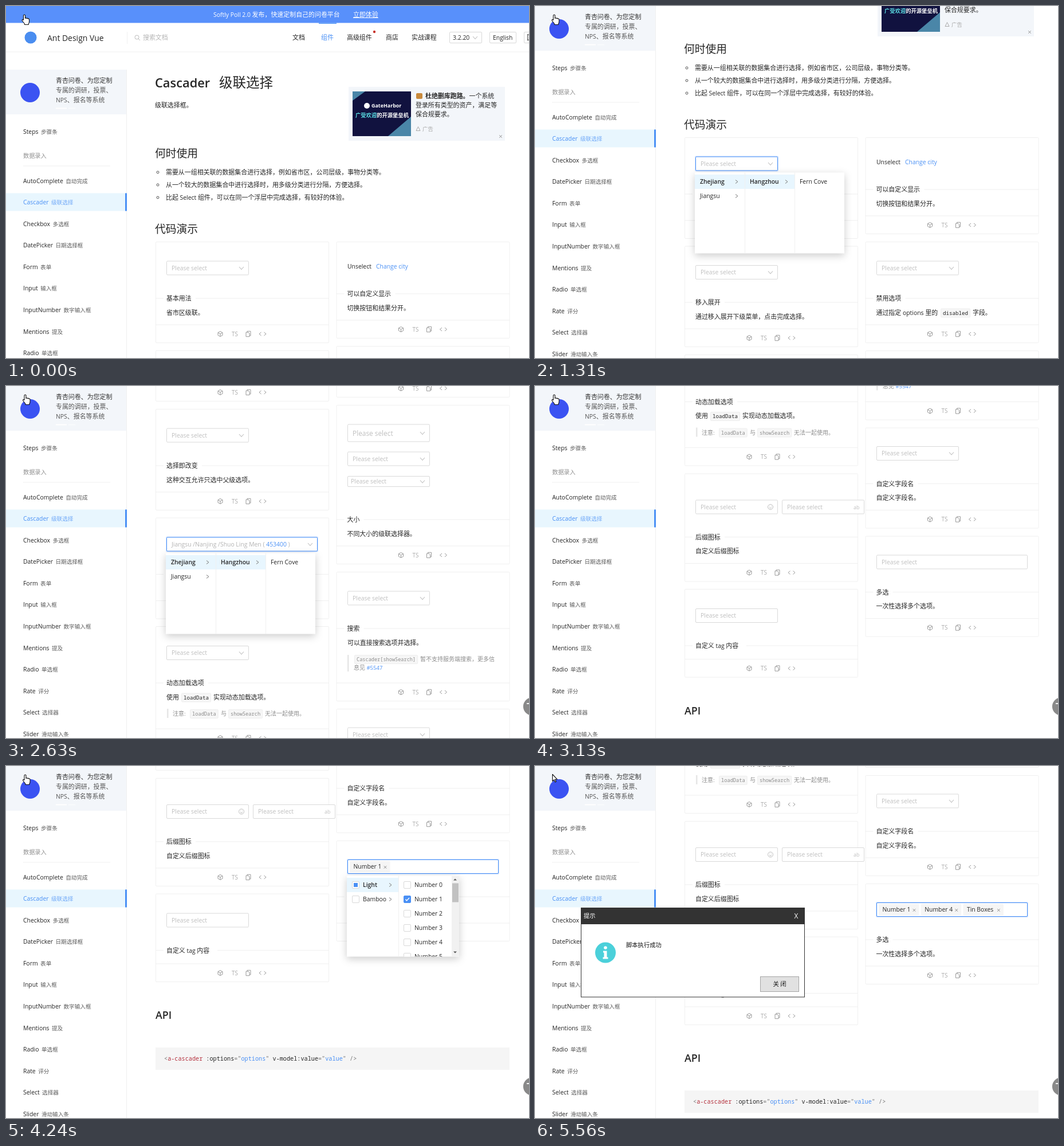
An HTML page for the animation above (5950 ms loop, 913 px wide and 614 px high).

```html
<!DOCTYPE html>
<html lang="zh-CN">
<head>
<meta charset="utf-8">
<title>Cascader</title>
<style>
html, body { margin: 0; width: 100%; height: 100%; overflow: hidden; background: #fff; }
svg { display: block; }
text { white-space: pre; font-family: "Open Sans", "Noto Sans CJK SC", "Noto Sans CJK", sans-serif; }
.mono { font-family: "Noto Sans Mono", "DejaVu Sans Mono", monospace; }
.pop { filter: drop-shadow(0 4px 7px rgba(0, 0, 0, .2)); }
</style>
</head>
<body>
<svg id="stage" width="913" height="614" viewBox="0 0 913 614"></svg>
<script>
const INK = '#262626', BLUE = '#4a90f5', HINT = '#bfbfbf', LINE = '#f0f0f0', ACTIVE = '#e8f6fe';
const LOOP = 5950, HINT_TEXT = 'Please select';

// drawing helpers
const esc = s => s.replace(/&/g, '&amp;').replace(/</g, '&lt;');
const latin = s => s.replace(/[ -~]+/g, m => `<tspan font-size=".95em">${esc(m)}</tspan>`);

// y is the optical middle of the line; s is a string or [text, attributes] runs
function text(x, y, s, { z = 10.95, c = INK, w = 400, mono, mid } = {}) {
  const fit = mono ? esc : latin;
  const body = typeof s === 'string' ? fit(s)
    : s.map(([t, a]) => `<tspan ${a}>${fit(t)}</tspan>`).join('');
  return `<text x="${x}" y="${y + z * .36}" font-size="${z}" fill="${c}" font-weight="${w}"` +
    `${mono ? ' class="mono"' : ''}${mid ? ' text-anchor="middle"' : ''}>${body}</text>`;
}
const rect = (x, y, w, h, fill, more = '') =>
  `<rect x="${x}" y="${y}" width="${w}" height="${h}" fill="${fill}" ${more}/>`;
const box = (x, y, w, h, stroke, fill = '#fff', r = 1.5) =>
  rect(x + .5, y + .5, w - 1, h - 1, fill, `stroke="${stroke}" rx="${r}"`);
const dot = (x, y, r, fill, more = '') => `<circle cx="${x}" cy="${y}" r="${r}" fill="${fill}" ${more}/>`;
const line = (x, y, d, c = '#999', w = 1) =>
  `<path transform="translate(${x} ${y})" d="${d}" fill="none" stroke="${c}" stroke-width="${w}"/>`;
const hr = (x1, x2, y) => rect(x1, y - .5, x2 - x1, 1, LINE);
const down = (x, y) => line(x, y, 'M-4-2L0 2.5 4-2', HINT, 1.1);
const next = (x, y) => line(x, y, 'M-2-3L2 0-2 3', '#777');
const cross = (x, y, r = 2.2) => line(x, y, `M${-r} ${-r}L${r} ${r}M${-r} ${r}L${r} ${-r}`, '#888');

function chip(x, y, s, z = 9.2, c = INK) {
  return box(x, y - 7.5, s.length * z * .6 + 8, 16, '#eee', '#f6f6f6') + text(x + 4, y + .5, s, { z, c, mono: 1 });
}

function select(x, y, w = 144, { h = 25, label = HINT_TEXT, c = HINT, focus, icon = 'v', z } = {}) {
  const end = x + w - 13;
  return (focus ? rect(x - 1, y - h / 2 - 1, w + 2, h + 2, '#cfe2ff', 'rx="2"') : '') +
    box(x, y - h / 2, w, h, focus ? BLUE : '#d9d9d9') +
    text(x + (h < 20 ? 6 : 9), y, label, { c, z }) +
    (icon === 'v' ? down(end, y)
      : icon === 'ab' ? text(end - 6, y + .5, 'ab', { z: 9.5, c: HINT })
      : icon === 'smile' ? dot(end, y, 4.5, 'none', `stroke="${HINT}"`) + line(end, y, 'M-2.2 1Q0 3.4 2.2 1M-1.8-1.5h.8M1-1.5h.8', HINT)
      : '');
}

function card(x, top, bottom, title, note, body, gap = 77.5) {
  const y = bottom - 16, ty = bottom - gap, g = '#9a9a9a';
  return box(x, top, 303, bottom - top, LINE) + hr(x, x + 303, ty - .5) +
    rect(x + 14, ty - 6, title.replace(/[ -~]/g, '').length * 11 + (/[a-z]/.test(title) ? 27 : 0) + 12, 12, '#fff') +
    text(x + 19, ty, title, { w: 500 }) + text(x + 19, bottom - 53, note) +
    hr(x, x + 303, bottom - 32) +
    line(x + 113, y, 'M0-4.5L4-2.3V2.3L0 4.5-4 2.3V-2.3ZM-4-2.3L0 0 4-2.3M0 0V4.5', g) +
    text(x + 133, y, 'TS', { z: 10.4, c: '#aaa' }) +
    line(x + 162, y, 'M-2-3V-4.7H4V3H2M-4-2.8H0L2-1V4.7H-4Z', g) +
    line(x + 187, y, 'M-2.5-3L-6 0-2.5 3M2.5-3L6 0 2.5 3', g) + body;
}

// columns: { w, items, on, check(i), bar }; an item ending in ">" has children
function menu(x, y, cols, alpha = 1) {
  const total = cols.reduce((sum, c) => sum + c.w, 0);
  let out = rect(x, y, total, 141, '#fff', 'class="pop"'), cx = x;
  cols.forEach((col, n) => {
    out += `<svg x="${cx}" y="${y}" width="${col.w}" height="141">`;
    col.items.forEach((item, i) => {
      const my = 16 + i * 25, on = col.on === i, mark = col.check && col.check(i);
      if (on) out += rect(0, my - 12.5, col.w, 25, ACTIVE);
      if (col.check) {
        out += box(9, my - 6.5, 13, 13, mark === 'all' ? BLUE : '#d9d9d9', mark === 'all' ? BLUE : '#fff');
        if (mark === 'all') out += line(15.5, my, 'M-3 0L-1 2.5 3.5-2.5', '#fff', 1.4);
        if (mark === 'some') out += rect(12, my - 3.5, 7, 7, BLUE);
      }
      out += text(col.check ? 28 : 9, my, item.replace('>', ''), { w: on ? 600 : 400 });
      if (item.endsWith('>')) out += next(col.w - 14, my);
    });
    if (col.bar) out += rect(93, 0, 13, 141, '#f1f1f1') + rect(94, 13, 11, 33, '#c1c1c1') +
      '<path d="M96 8l3-3 3 3zM96 132l3 3 3-3z" fill="#555"/>';
    out += '</svg>';
    if (n) out += rect(cx, y, 1, 141, LINE);
    cx += col.w;
  });
  return `<g opacity="${alpha}">${out}</g>`;
}

// page parts
function header() {
  const nav = [['文档', 500], ['组件', 550], ['高级组件', 595], ['商店', 663], ['实战课程', 708]];
  return rect(0, 0, 913, 29.5, '#5890fb') +
    text(362, 15, 'Softly Poll 2.0 发布，快速定制自己的问卷平台', { c: '#fff' }) +
    text(606, 15, [['立即体验', 'text-decoration="underline"']], { c: '#fff' }) +
    hr(0, 913, 80) + dot(43, 55, 10.5, '#4a8df0') + text(72, 55.5, 'Ant Design Vue', { z: 14.7, w: 500 }) +
    rect(211, 45, 1, 21, LINE) + dot(228.5, 54.5, 3.5, 'none', 'stroke="#bbb"') +
    line(231, 57, 'M0 0l3 3', '#bbb') + text(239, 55, '搜索文档', { c: '#b5b5b5' }) +
    nav.map(([s, x]) => text(x, 55, s, { c: x === 550 ? BLUE : INK })).join('') +
    rect(546, 29.5, 31, 1.5, BLUE) + dot(643, 45, 2.2, '#c8322b') +
    box(774, 45, 57, 20, '#d9d9d9') + text(780, 55, '3.2.20') + down(819, 55) +
    box(844, 45, 47, 20, '#d9d9d9') + text(850, 55, 'English') +
    box(904, 45, 40, 20, '#d9d9d9') + text(909, 55, '国内');
}

function intro() {
  const points = ['需要从一组相关联的数据集合进行选择，例如省市区，公司层级，事物分类等。',
    '从一个较大的数据集合中进行选择时，用多级分类进行分隔，方便选择。',
    '比起 Select 组件，可以在同一个浮层中完成选择，有较好的体验。'];
  return text(260, 134, 'Cascader', { z: 23, w: 600 }) + text(372, 134, '级联选择', { z: 23.5, w: 500 }) +
    text(260, 173.5, '级联选择框。') +
    rect(598, 141, 273, 94, '#f3f6fa') + rect(605, 149, 102, 78, '#11123f') +
    '<path d="M605 149h22l-22 16zM707 227h-40l40-34z" fill="#4a86a8"/>' +
    dot(630, 174, 5, '#fff') + text(638, 174, 'GateHarbor', { z: 9.4, w: 700, c: '#fff' }) +
    text(610, 190.5, [['广受欢迎', 'fill="#5ce0e6"'], ['的开源堡垒机', '']], { z: 9.3, w: 700, c: '#fff' }) +
    rect(716, 152, 11, 10, '#c98a3c', 'rx="2"') +
    text(732, 157, [['杜绝删库跑路。', 'font-weight="700"'], ['一个系统', '']]) +
    text(715, 173, '登录所有类型的资产，满足等') + text(715, 189, '保合规要求。') +
    line(719.5, 214.5, 'M-3.5 3L0-4 3.5 3Z', '#aaa') + text(727, 214.5, '广告', { z: 9.4, c: '#aaa' }) + cross(863.5, 227.5) +
    text(260, 257, '何时使用', { z: 18.8, w: 500 }) +
    points.map((s, i) => dot(265, 290 + i * 22, 2, '#fff', 'stroke="#555"') + text(279, 290 + i * 22, s)).join('') +
    text(260, 389, '代码演示', { z: 18.8, w: 500 });
}

function demos(s) {
  const L = 261, R = 576.5, lx = 280, rx = 596, grey = '#8c8c8c';
  const place = s.v4 ? ['Zhejiang /Hangzhou /Fern Cove ( ', '752100'] : ['Jiangsu /Nanjing /Shuo Ling Men ( ', '453400'];
  const label4 = [[place[0], ''], [place[1], `fill="${BLUE}"`], [' )', '']];
  const tags = s.tags.map((t, i) => rect(600 + i * 73.7, 1537.5, 70.5, 20, '#f5f5f5', 'rx="1.5"') +
    text(606.5 + i * 73.7, 1547.5, t) + cross(662 + i * 73.7, 1548.5)).join('');
  const code = [['<', 'fill="#777"'], ['a-cascader', 'fill="#b5323f"'], [' :options', ''], ['="', 'fill="#777"'],
    ['options', `fill="${BLUE}"`], ['" ', 'fill="#777"'], ['v-model:value', ''], ['="', 'fill="#777"'],
    ['value', `fill="${BLUE}"`], ['" />', 'fill="#777"']];
  return card(L, 411, 588, '基本用法', '省市区级联。',
      select(lx, 457, 144, { focus: s.focus === 1, label: s.v1 ? 'Zhejiang / Hangzhou…' : HINT_TEXT, c: s.v1 ? INK : HINT })) +
    card(L, 600.5, 777, '移入展开', '通过移入展开下级菜单，点击完成选择。', select(lx, 646.5)) +
    card(L, 790, 967, '选择即改变', '这种交互允许只选中父级选项。', select(lx, 836)) +
    card(L, 979.5, 1156.5, '自定义已选项', '例如给最后一项加上邮编链接。',
      select(lx, 1026, 264, { focus: s.focus === 4, label: label4, c: s.m4 ? '#b3b3b3' : INK })) +
    card(L, 1169, 1380, '动态加载选项', '', select(lx, 1215.5) +
      text(lx, 1293, '使用') + chip(306, 1293, 'loadData') + text(362, 1293, '实现动态加载选项。') +
      rect(281, 1313, 2.5, 16, '#e6e6e6') + text(291, 1321.5, '注意:', { z: 10, c: grey }) +
      chip(321, 1321.5, 'loadData', 8.7, grey) + text(375, 1321.5, '与', { z: 10, c: grey }) +
      chip(388, 1321.5, 'showSearch', 8.7, grey) + text(452, 1321.5, '无法一起使用。', { z: 10, c: grey }), 111.5) +
    card(L, 1393, 1582, '后缀图标', '自定义后缀图标',
      select(lx, 1451.5, 144, { icon: 'smile' }) + select(431, 1451.5, 144, { icon: 'ab' })) +
    card(L, 1594.5, 1749, '自定义 tag 内容', '', select(lx, 1641, 144, { icon: '' }), 55) +
    card(R, 411, 580, '可以自定义显示', '切换按钮和结果分开。',
      text(rx, 454, 'Unselect') + text(646, 454, 'Change city', { c: BLUE })) +
    card(R, 593, 770, '禁用选项', '通过指定 options 里的', select(rx, 639) +
      chip(708, 717, 'disabled') + text(764, 717, '字段。')) +
    card(R, 783, 1061, '大小', '不同大小的级联选择器。',
      select(rx, 832, 144, { h: 31, z: 12.5 }) + select(rx, 877) + select(rx, 916.5, 144, { h: 19 })) +
    card(R, 1074, 1300, '搜索', '', select(rx, 1120) + text(rx, 1198, '可以直接搜索选项并选择。') +
      rect(596, 1219, 2.5, 29, '#e6e6e6') + chip(608, 1226.5, 'Cascader[showSearch]', 8.6, grey) +
      text(723, 1226, '暂不支持服务端搜索，更多信', { z: 10, c: grey }) +
      text(607, 1241, [['息见 ', ''], ['#5547', `fill="${BLUE}"`]], { z: 10, c: grey }), 126.5) +
    card(R, 1313, 1489, '自定义字段名', '自定义字段名。', select(rx, 1358)) +
    card(R, 1502, 1678, '多选', '一次性选择多个选项。',
      select(rx, 1547.5, 264, { focus: s.focus === 6, label: s.tags.length ? '' : HINT_TEXT, icon: '' }) + tags) +
    text(261, 1806.5, 'API', { z: 18.8, w: 600 }) + rect(261, 1863, 618, 39, '#f5f5f5') +
    text(276, 1882, code, { z: 10.2, mono: 1 });
}

const cities = n => [
  { w: 87, items: ['Zhejiang>', 'Jiangsu>'], on: n > 1 ? 0 : -1 },
  { w: 87, items: ['Hangzhou>'], on: n > 2 ? 0 : -1 },
  { w: 87, items: ['Fern Cove'] }
].slice(0, n);

function multi(s) {
  const picked = i => s.tags.includes('Number ' + i) ? 'all' : '';
  const toys = s.tags.includes('Tin Boxes');
  const cols = [{ w: 90, items: ['Light>', 'Bamboo>'], on: { light: 0, bamboo: 1, little: 1 }[s.m6],
    check: i => (i ? toys : s.tags.length) ? 'some' : '' }];
  if (s.m6 === 'light') cols.push({ w: 106, items: Array.from({ length: 6 }, (_, i) => 'Number ' + i), check: picked, bar: 1 });
  if (s.m6 === 'bamboo' || s.m6 === 'little')
    cols.push({ w: 87, items: ['Little>'], on: s.m6 === 'little' ? 0 : -1, check: () => toys ? 'some' : '' });
  if (s.m6 === 'little')
    cols.push({ w: 87, items: ['Tin Drums', 'Tin Boxes', 'Tin Birds'], check: i => i === 1 && toys ? 'all' : '' });
  return menu(595, 1563.5, cols, s.fade);
}

function sidebar(s) {
  const w = s.bar ? 197 : 210;
  const items = [['AutoComplete', '自动完成'], ['Cascader', '级联选择'], ['Checkbox', '多选框'], ['DatePicker', '日期选择框'],
    ['Form', '表单'], ['Input', '输入框'], ['InputNumber', '数字输入框'], ['Mentions', '提及'], ['Radio', '单选框'],
    ['Rate', '评分'], ['Select', '选择器'], ['Slider', '滑动输入条']];
  const entry = (y, [en, zh], c = INK) => text(30, y, [[en, ''], [zh, 'dx="4.5" font-size="9.6" fill-opacity=".75"']], { c });
  return rect(210, 0, 1, 614, LINE) + rect(0, 0, 210, 78, '#f3f6fa') + dot(42, 40, 17, '#3b53f2') +
    text(87, 19, '青杏问卷、为您定制', { w: 500, c: '#333' }) + text(87, 36, '专属的调研，投票、', { c: '#555' }) +
    text(87, 53, 'NPS、报名等系统', { c: '#555' }) + rect(87, 66.5, 19, 2, '#fff') + rect(109, 66.5, 12, 2, '#fff', 'opacity=".5"') +
    entry(108.5, ['Steps', '步骤条']) + text(30, 150.5, '数据录入', { z: 10.2, c: '#909090' }) + hr(30, w - 28, 168) +
    rect(0, 215.5, w, 31, ACTIVE) + rect(w - 2, 215.5, s.bar ? 2 : 3, 31, '#4a90f5') +
    items.map((it, i) => entry(193.6 + i * 37.57, it, i === 1 ? BLUE : INK)).join('') +
    (s.bar ? rect(197, 78, 14, 536, '#f1f1f1') + rect(199, 167, 10, 121, '#c1c1c1') +
      '<path d="M200.5 605h7l-3.5 4z" fill="#444"/>' : '');
}

const dialog = () => rect(80, 247, 391, 156.5, '#333') + rect(81, 276, 389, 126.5, '#fff') +
  text(85, 261, '提示', { z: 10.3, c: '#fff' }) + text(456, 261, 'X', { z: 12.5, c: '#fff', mid: 1 }) +
  dot(123, 325.5, 18, '#4bd0da') + dot(123, 317, 2.8, '#fff') +
  '<path d="M119 322.5h6.5v11h2v3h-9v-3h2v-8h-1.5z" fill="#fff"/>' +
  text(159, 312, '脚本执行成功', { z: 10.3, c: '#111' }) +
  box(393, 367, 68, 27, '#a5a5a5', '#e1e1e1', 0) + text(427, 380.5, '关 闭', { z: 10.3, c: '#111', mid: 1 });

const shapes = {
  arrow: 'M4 0V12L6.8 9.5 8.6 13.6 10.4 12.8 8.6 8.8H12.4Z',
  hand: 'M4 10V2.2a1.5 1.5 0 0 1 3 0V7a1.5 1.5 0 0 1 2.6.3 1.4 1.4 0 0 1 2.4.6 1.2 1.2 0 0 1 2 1V13q0 2-1.2 3.5V18H6v-1.5L2 11.5q-1-1.5 0-2.2t2 .7z'
};
function pointer(kind, x) {
  if (kind === 'beam') return line(33.5, 16.5, 'M-3-5.5h2.3L0-5 .7-5.5H3M0-5V5M-3 5.5h2.3L0 5 .7 5.5H3', '#222');
  return `<path transform="translate(${x} 14.5)" d="${shapes[kind]}" fill="#fff" stroke="#111" stroke-width="1.1" stroke-linejoin="round"/>`;
}

// each step changes part of the state
const steps = [
  [0, { y: 0, focus: 0, m1: 0, m4: 0, m6: '', v1: 0, v4: 0, tags: [], bar: 0, fade: 1, top: 0, hand: 'hand', hx: 26.5, done: 0 }],
  [110, { y: 150, bar: 1, hx: 28 }],
  [610, { focus: 1 }], [710, { m1: 1, fade: .6 }], [810, { fade: 1 }],
  [910, { y: 182, bar: 0 }], [1010, { m1: 2 }], [1210, { m1: 3 }],
  [1510, { v1: 1, fade: .5 }], [1610, { m1: 0 }],
  [1810, { y: 719, top: .25, hand: 'beam', focus: 0 }],
  [1910, { focus: 4, top: .7, hand: 'hand' }], [2010, { m4: 1, fade: .6, top: 1 }], [2110, { fade: 1 }],
  [2210, { y: 750 }], [2310, { m4: 2 }], [2430, { bar: 1 }], [2530, { m4: 3, bar: 0 }],
  [2830, { v4: 1, fade: .5 }], [2930, { m4: 0 }], [3130, { y: 1240.5, focus: 0 }],
  [3330, { focus: 6 }], [3430, { m6: 'root', fade: 1 }], [3530, { y: 1272 }], [3630, { m6: 'light' }],
  [3930, { y: 1297 }], [4030, { tags: ['Number 1'] }], [4230, { y: 1372 }], [4340, { tags: ['Number 1', 'Number 4'] }],
  [4640, { y: 1297, hx: 26.5 }], [4840, { m6: 'bamboo' }],
  [5040, { y: 1272 }], [5140, { m6: 'little' }], [5240, { y: 1297 }],
  [5340, { tags: ['Number 1', 'Number 4', 'Tin Boxes'] }], [5440, { m6: '' }],
  [5560, { hand: 'arrow', done: 1 }]
];
const states = [];
steps.forEach(([, change], i) => states.push({ ...states[i - 1], ...change }));

function draw(s) {
  return `<g transform="translate(0 ${-s.y})">` + header() + intro() + demos(s) +
    (s.m1 ? menu(279, 472.5, cities(s.m1), s.fade) : '') +
    (s.m4 ? menu(279, 1041.5, cities(s.m4), s.fade) : '') +
    (s.m6 ? multi(s) : '') + '</g>' +
    `<g transform="translate(0 ${Math.max(0, 111 - s.y)})">` + sidebar(s) + '</g>' +
    `<g opacity="${s.top}">` + dot(918.5, 559, 15.6, '#898989') + rect(909, 553, 8, 1.8, '#fff') + '</g>' +
    (s.done ? dialog() : '') + pointer(s.hand, s.hx);
}

const stage = document.getElementById('stage');
let shown = -1;
function tick() {
  const t = performance.now() % LOOP;
  const i = steps.findLastIndex(([at]) => at <= t);
  if (i !== shown) stage.innerHTML = draw(states[shown = i]);
  requestAnimationFrame(tick);
}
tick();
</script>
</body>
</html>
```
